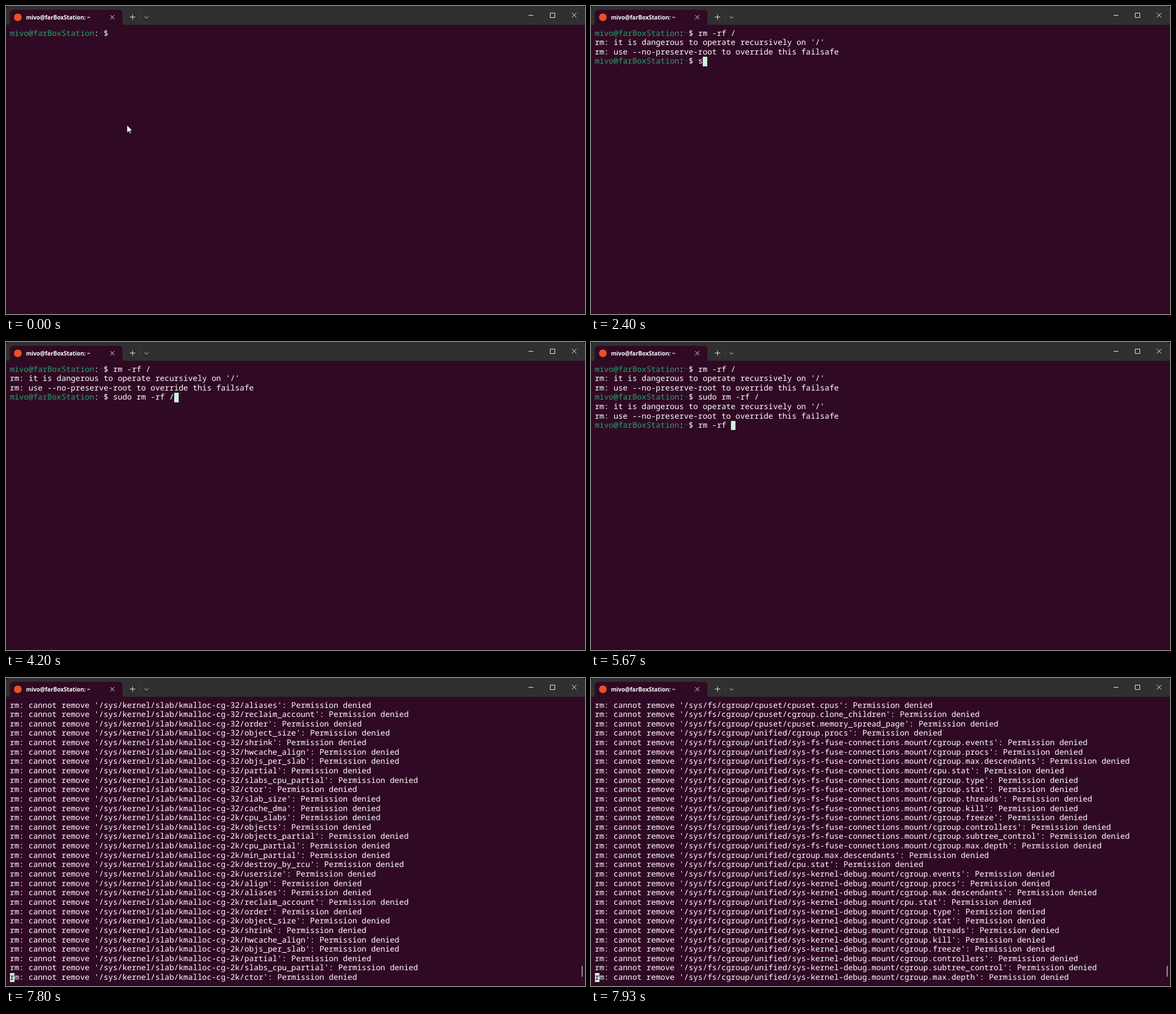
Animation, 1026 px wide and 546 px high, one loop 8000 ms. Source, as an HTML page:

```html
<!DOCTYPE html>
<html lang="en">
<head>
<meta charset="utf-8">
<title>Terminal</title>
<style>
html, body { margin: 0; width: 100%; height: 100%; overflow: hidden; background: #111; }
#window { position: absolute; width: 1026px; height: 546px; overflow: hidden; border-radius: 6px; background: #300a24; }
svg { position: absolute; left: 0; top: 0; }
pre {
  position: absolute; left: 6.66px; top: 40.5px; margin: 0; color: #fff;
  font: 500 13.867px/16.64px "Noto Sans Mono", monospace; text-rendering: geometricPrecision;
}
.user { color: #26a269; }
.path { color: #12488b; }
b, mark { display: inline-block; position: relative; top: -.5px; height: 16.64px; vertical-align: top; font-weight: 500; color: #300a24; }
b { width: 8.32px; background: #ccf2dc; }
mark { background: #fff; }
</style>
</head>
<body>
<div id="window">
  <pre id="screen"></pre>
  <svg width="1026" height="546" fill="none" stroke="#fff" stroke-width=".9">
    <path d="M0 0H1026V33.3H0z" fill="#303030" stroke="none"/>
    <path d="M3 33.4q3.6 0 3.6-3.6V13.5q0-6.7 6.7-6.7H199.7q6.7 0 6.7 6.7v16.3q0 3.6 3.6 3.6z" fill="#300a24" stroke="none"/>
    <circle cx="21" cy="20" r="6.8" fill="#e95420" stroke="none"/>
    <text x="35.5" y="23.7" fill="#fff" stroke="none" font-family="Open Sans, sans-serif" font-size="10" font-weight="700">mivo@farBoxStation: ~</text>
    <path d="M184.7 16.2l7.4 7.4m0-7.4l-7.4 7.4M219.5 19.5h9.5M224.3 15v9.4M245.6 18.3l3.3 3.3 3.3-3.3"/>
    <path d="M237.5 12v16" stroke="#454545"/>
    <path d="M926 16.5h8.5M964.5 12.5h8v8h-8zM1002.8 12.3l8 8m0-8l-8 8"/>
    <path id="pointer" d="M214.5 211.3v13.2l3-2.8 2 4.4 2.1-.9-2-4.3h4.3z" fill="#fff" stroke="#111" stroke-width=".6"/>
    <path id="scrollbar" d="M1021 510.5v19" stroke="#aaa" stroke-width="1.7"/>
  </svg>
</div>
<script>
const LOOP = 8000, PASTE = 6530, PASTE_END = 6730, FLOOD = 7800;
const byId = id => document.getElementById(id);
const prompt = '<span class="user">mivo@farBoxStation</span>:<span class="path">~</span>$ ';
const refusal = "\nrm: it is dangerous to operate recursively on '/'" +
  "\nrm: use --no-preserve-root to override this failsafe\n" + prompt;

// [first key, last key, keys]; a newline runs the command
const typing = [
  [600, 600, 'r'], [800, 1330, 'm -rf '], [1470, 1470, '/'], [1800, 1800, '\n'],
  [2400, 2400, 's'], [2470, 2730, 'udo'], [2930, 2930, ' '], [3330, 3330, 'r'],
  [3530, 3530, 'm'], [3670, 4200, ' -rf /'], [4470, 4470, '\n'],
  [4870, 5070, 'rm '], [5270, 5330, '-r'], [5530, 5530, 'f'], [5670, 5670, ' '],
  [PASTE, PASTE, '--no-preserve-root'], [PASTE_END, PASTE_END, ' '], [7530, 7530, '/']
];

const slabFiles = ('cpu_slabs objects objects_partial cpu_partial min_partial destroy_by_rcu usersize ' +
  'align aliases reclaim_account order object_size shrink hwcache_align objs_per_slab partial ' +
  'slabs_cpu_partial ctor slab_size cache_dma').split(' ');
const groupFiles = ('cgroup.events cgroup.procs cgroup.max.descendants cpu.stat cgroup.type cgroup.stat ' +
  'cgroup.threads cgroup.kill cgroup.freeze cgroup.controllers cgroup.subtree_control cgroup.max.depth').split(' ');

const slabPage = (first, caches) => Array.from({ length: 30 }, (_, i) => {
  const n = first + i;
  return `kernel/slab/kmalloc-cg-${caches[Math.floor(n / 20)]}/${slabFiles[n % 20]}`;
});
const mount = name => groupFiles.map(file => `fs/cgroup/unified/${name}.mount/${file}`);
const groupPage = [
  ...['cpuset.cpus', 'cgroup.clone_children', 'cpuset.memory_spread_page'].map(f => 'fs/cgroup/cpuset/' + f),
  'fs/cgroup/unified/cgroup.procs',
  ...mount('sys-fs-fuse-connections'),
  'fs/cgroup/unified/cgroup.max.descendants', 'fs/cgroup/unified/cpu.stat',
  ...mount('sys-kernel-debug')
];
const denied = paths => paths.map((path, i) =>
  `${i === 29 ? '<b>r</b>' : 'r'}m: cannot remove '/sys/${path}': Permission denied`).join('\n');
const floods = [slabPage(8, ['32', '2k']), slabPage(4, ['64', '4k']), groupPage].map(denied);

function session(t) {
  let out = prompt;
  for (const [start, end, keys] of typing) {
    if (start === PASTE) {
      if (t >= PASTE) out += t < PASTE_END ? `<mark>${keys}</mark>` : keys;
      continue;
    }
    const gap = (end - start) / Math.max(1, keys.length - 1);
    [...keys].forEach((key, i) => {
      if (t >= start + gap * i) out += key === '\n' ? refusal : key;
    });
  }
  return out + (t >= 130 ? '<b> </b>' : '');
}

let shown;
function draw() {
  const t = performance.now() % LOOP;
  const html = t < FLOOD ? session(t) : floods[t < 7870 ? 0 : t < 7930 ? 1 : 2];
  if (html !== shown) byId('screen').innerHTML = shown = html;
  byId('pointer').style.display = t < 600 ? '' : 'none';
  byId('scrollbar').style.display = t < FLOOD ? 'none' : '';
  requestAnimationFrame(draw);
}
draw();
</script>
</body>
</html>
```
